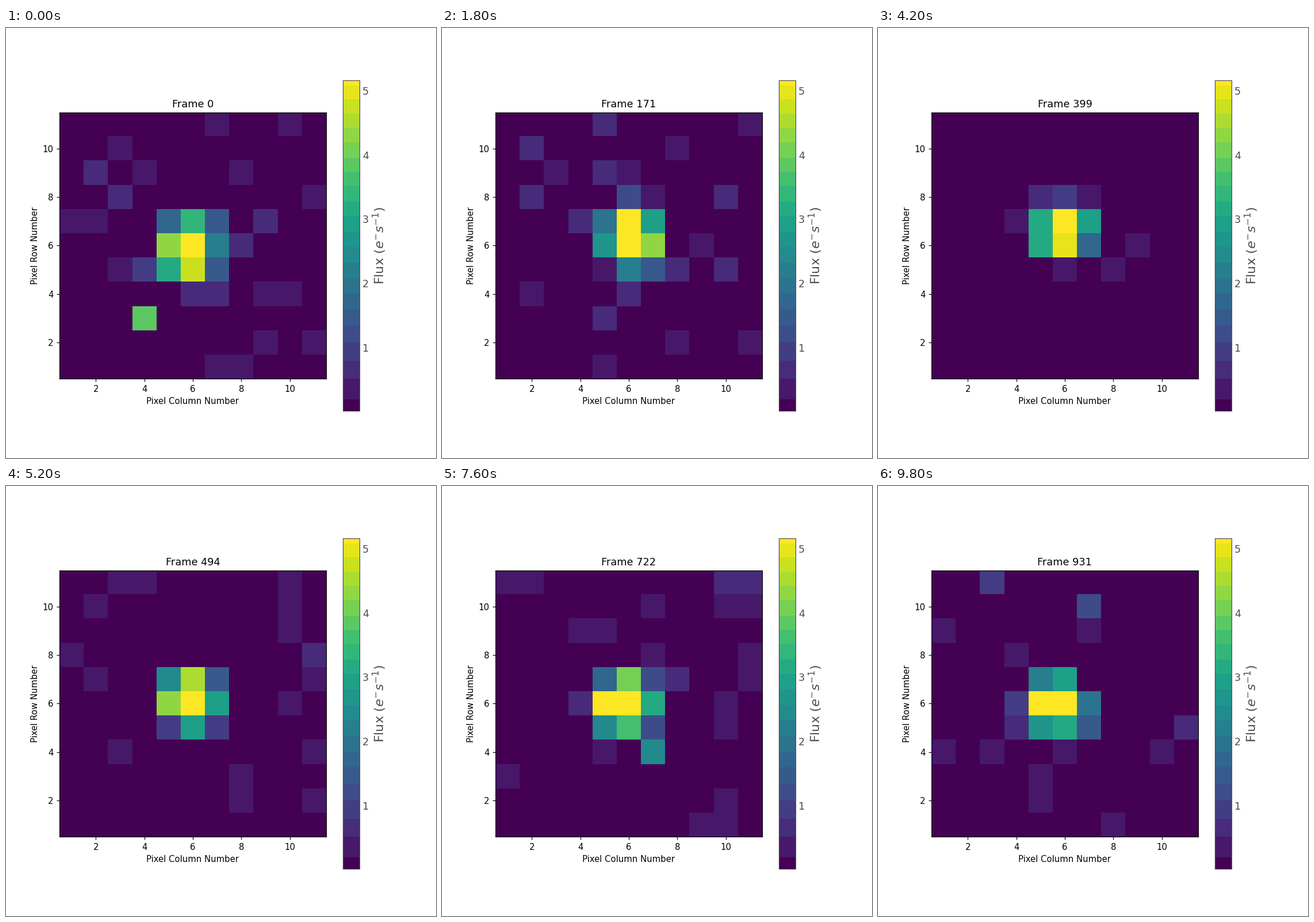
A matplotlib script for the animation above (10000 ms loop, 748 by 748 pixels).

```python
import numpy as np
import matplotlib.pyplot as plt
from matplotlib.animation import FuncAnimation
from matplotlib.colors import ListedColormap

SIZE, FRAMES, INTERVAL = 748, 50, 200
CADENCE = 19              # exposures skipped between steps
N = 11                    # pixels per side
VMIN, VMAX = 0.014, 5.163
PEAK, WIDTH = 8.5, 0.8    # height and sigma of the star's spot

# Star centre at a few exposures; it drifts evenly between them
TIMES = [0, 95, 247, 399, 608, 722, 931]
TRACK_X = [5.85, 6.2, 6.1, 5.85, 6.15, 5.8, 5.7]
TRACK_Y = [5.9, 6.0, 6.6, 6.6, 5.55, 6.0, 5.9]

# Cosmic-ray hits: exposure -> column, row, flux
HITS = {0: (4, 3, 3.75), 608: (8, 7, 1.7), 722: (7, 4, 2.35)}
DIM = 399                 # exposure with an over-subtracted background

plt.rcParams["font.family"] = "DejaVu Sans"


def banded_viridis():
    """Viridis in flat steps that narrow towards the top."""
    bands = .18 + 4.91 * np.linspace(0, 1, 21) ** .9
    edges = np.array([VMIN, *bands, VMAX])
    mids = ((edges[:-1] + edges[1:]) / 2 - VMIN) / (VMAX - VMIN)
    mids[0], mids[-1] = 0, 1
    flux = np.linspace(VMIN, VMAX, 256)
    return ListedColormap(plt.get_cmap("viridis")(mids)[np.digitize(flux, bands)])


def flux_at(exposure):
    """Gaussian star on a noisy, background-subtracted sky."""
    rng = np.random.default_rng(exposure)
    x0 = np.interp(exposure, TIMES, TRACK_X)
    y0 = np.interp(exposure, TIMES, TRACK_Y)
    y, x = np.mgrid[1:N + 1, 1:N + 1]
    star = PEAK * np.exp(-((x - x0) ** 2 + (y - y0) ** 2) / (2 * WIDTH ** 2))
    offset = -.75 if exposure == DIM else -.23
    grid = star + rng.normal(offset, .45, (N, N))
    if exposure in HITS:
        col, row, flux = HITS[exposure]
        grid[row - 1, col - 1] = flux
    return grid


fig, ax = plt.subplots(figsize=(7, 7), dpi=SIZE / 7)
dx, dy = .4 / SIZE, .75 / SIZE    # settles the frame lines on whole pixels
fig.subplots_adjust(left=.125 - dx, right=.9 - dx, bottom=.11 - dy, top=.88 - dy)

image = ax.imshow(flux_at(0), cmap=banded_viridis(), vmin=VMIN, vmax=VMAX,
                  origin="lower", extent=(.5, N + .5, .5, N + .5),
                  interpolation="nearest")
ax.set_xlabel("Pixel Column Number")
ax.set_ylabel("Pixel Row Number")
ax.set_xticks(range(2, N, 2))
ax.set_yticks(range(2, N, 2))
title = ax.set_title("Frame 0")

bar = fig.colorbar(image, ax=ax, ticks=range(1, 6))
bar.ax.tick_params(length=0, labelsize=12, labelcolor=".3")
bar.set_label("Flux ($e^{-}s^{-1}$)", size=15, color=".3", labelpad=3)
bar.outline.set_edgecolor(".3")


def update(i):
    exposure = i * CADENCE
    image.set_data(flux_at(exposure))
    title.set_text(f"Frame {exposure}")
    return image, title


anim = FuncAnimation(fig, update, frames=FRAMES, interval=INTERVAL,
                     repeat=True, repeat_delay=0)
plt.show()
```
